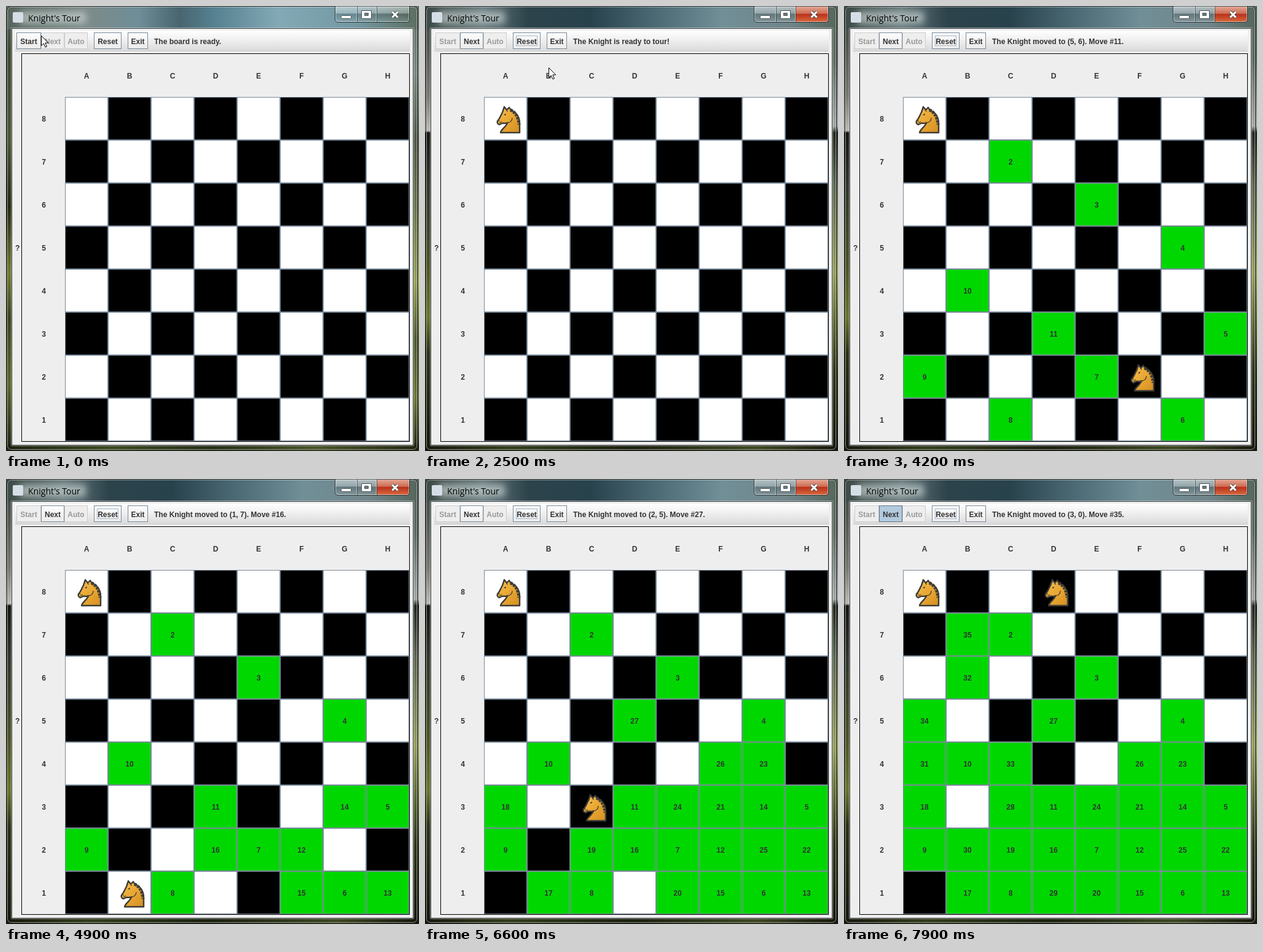
An HTML page for the animation above (8 s loop, 672 px wide and 724 px high).

```html
<!DOCTYPE html>
<html lang="en">
<head>
<meta charset="utf-8">
<title>Knight's Tour</title>
<style>
html, body { margin: 0; width: 100%; height: 100%; overflow: hidden; background: #222; }
svg { display: block; width: 672px; height: 724px; }
text { font: bold 12px "Liberation Sans", Arial, sans-serif; fill: #333; }
.mid { text-anchor: middle; }
.title { font: 14px "Open Sans", "Noto Sans", sans-serif; fill: #000; }
.btn rect { fill: url(#face); stroke: #7a8a99; }
.btn .focus { fill: none; stroke: #a3b8cc; visibility: hidden; }
.btn.focused .focus { visibility: visible; }
.btn.off rect { fill: #eee; stroke: #ccc; }
.btn.off text { fill: #999; }
.btn.down .face { fill: #b2cade; stroke: #5f7183; }
.cell { stroke: #7a8a99; }
</style>
</head>
<body>
<svg id="stage" viewBox="0 0 672 724" xmlns="http://www.w3.org/2000/svg">
<defs>
  <linearGradient id="face" x2="0" y2="1"><stop stop-color="#fdfdfd"/><stop offset="1" stop-color="#ebebeb"/></linearGradient>
  <linearGradient id="bar" x2="0" y2="1"><stop stop-color="#fff"/><stop offset=".45" stop-color="#f0f0f0"/><stop offset="1" stop-color="#dadada"/></linearGradient>
  <linearGradient id="red" x2="0" y2="1"><stop stop-color="#e3a796"/><stop offset=".45" stop-color="#cf6a50"/><stop offset=".5" stop-color="#b8321a"/><stop offset="1" stop-color="#d9693f"/></linearGradient>
  <linearGradient id="glass" x2="0" y2="1"><stop stop-color="#fff" stop-opacity=".5"/><stop offset=".45" stop-color="#fff" stop-opacity=".25"/><stop offset=".5" stop-color="#000" stop-opacity=".12"/><stop offset="1" stop-color="#fff" stop-opacity=".15"/></linearGradient>
  <linearGradient id="coat" x2="1" y2="1"><stop stop-color="#f3c050"/><stop offset=".5" stop-color="#e9a733"/><stop offset="1" stop-color="#d48f22"/></linearGradient>
  <filter id="soft" x="-30%" y="-80%" width="160%" height="260%"><feGaussianBlur stdDeviation="6"/></filter>
  <g id="knight">
    <path d="M33 16L37 21L41 17L44 22C53 25 58 33 58 43V58H27C28 52 36 49 38 42C34 44 32 42 29 43L25 45C22 44 21 42 22 39C26 35 27 30 30 25C31 22 32 19 33 16Z" fill="url(#coat)" stroke="#3e3d38" stroke-width="2.4" stroke-linejoin="round"/>
    <path d="M43 21C51 25 56 32 57 45" fill="none" stroke="#3e3d38" stroke-width="5" stroke-dasharray="4 1.5"/>
    <path d="M46 34C46 39 42 42 38 42M25 42L29 40M37 21L38 24" fill="none" stroke="#3e3d38" stroke-width="1.3"/>
    <path d="M32 29L36 27L35 30Z" fill="#2c2b28"/>
    <circle cx="24.5" cy="39" r=".9" fill="#3e3d38"/>
  </g>
</defs>
<g id="idle"></g>
<g id="live"></g>
<g id="frame"></g>
<g id="client"></g>
<g id="board"></g>
<use id="first" href="#knight" x="96" y="148"/>
<use id="rider" href="#knight"/>
<path id="arrow" d="M.5 .5V16.5L4.2 13L7 19L9.4 18L6.8 12H11.8Z" fill="#fff" stroke="#000"/>
</svg>
<script>
const $ = id => document.getElementById(id);
const NS = 'http://www.w3.org/2000/svg';

function add(parent, tag, attrs, text) {
  const el = document.createElementNS(NS, tag);
  for (const key in attrs) el.setAttribute(key, attrs[key]);
  if (text) el.textContent = text;
  parent.appendChild(el);
  return el;
}

const box = (parent, x, y, width, height, fill, more) =>
  add(parent, 'rect', { x, y, width, height, fill, ...more });

// stops: "offset colour" pairs separated by commas
function gradient(id, stops, vertical) {
  const g = add(document.querySelector('defs'), 'linearGradient',
    { id, x2: vertical ? 0 : 1, y2: vertical ? 1 : 0 });
  for (const stop of stops.split(',')) {
    const [offset, color] = stop.trim().split(' ');
    add(g, 'stop', { offset, 'stop-color': color });
  }
  return `url(#${id})`;
}

// Blurred landscape seen through the glass border
function scenery(id, top, left, right, bottom) {
  const g = $(id);
  box(g, 0, 0, 12, 724, gradient(id + 'L', left, true));
  box(g, 660, 0, 12, 724, gradient(id + 'R', right, true));
  box(g, 0, 712, 672, 12, gradient(id + 'B', bottom));
  box(g, 0, 0, 672, 38, gradient(id + 'T', top));
}

scenery('idle',
  '0 #56645c, .2 #7c8b89, .32 #6f8e98, .42 #486570, .5 #55808f, .66 #83a9b6, .85 #7398a2, 1 #5c6e60',
  '0 #55635a, .1 #3c4a30, .3 #4a5535, .45 #23290f, .6 #6f7b33, .7 #39431a, .85 #59672a, 1 #1d2210',
  '0 #5f7064, .15 #7b8a80, .3 #4d5a45, .45 #68754c, .62 #98a354, .75 #4e5a28, .88 #6c7836, 1 #20260f',
  '0 #1d2210, .25 #3d4820, .5 #262d16, .75 #4a5428, 1 #20260f');
scenery('live',
  '0 #3c4a45, .14 #66777a, .25 #2c434b, .4 #28424c, .55 #4a6873, .72 #718f97, .88 #70858a, 1 #55665b',
  '0 #3c4a45, .08 #4e544c, .2 #77796f, .28 #b9bab2, .285 #14170f, .4 #30362a, .58 #4a5226, .7 #66752a, .78 #2a3115, 1 #15180c',
  '0 #55665b, .12 #5d6b62, .27 #a2a9a4, .285 #20261c, .4 #5b6650, .6 #96a05a, .72 #59662e, .82 #2d3518, 1 #15180c',
  '0 #15180c, .2 #343d1b, .5 #1b200f, .8 #3f4822, 1 #15180c');

const frame = $('frame');
const line = (x, y, w, h, stroke, rx) => box(frame, x, y, w, h, 'none', { stroke, rx });
line(1.5, .5, 668, 722, '#15191a', 7);
line(2.5, 1.5, 666, 720, 'rgba(255,255,255,.5)', 6);
line(8.5, 35.5, 655, 680, 'rgba(255,255,255,.5)', 1);
line(9.5, 36.5, 653, 678, '#2b3234', 0);
box(frame, 22, 9, 108, 20, '#cfdad9', { filter: 'url(#soft)', opacity: .65 });
box(frame, 11, 10, 17, 17, '#d5dee6', { rx: 2 });
add(frame, 'text', { x: 36, y: 25, class: 'title' }, "Knight's Tour");

// Window controls
const controls = 'M535.5 0V21Q535.5 26.5 541 26.5H651Q656.5 26.5 656.5 21V0Z';
add(frame, 'path', { d: controls, fill: 'url(#glass)', stroke: '#273236' });
const close = add(frame, 'path', { d: 'M603 1H656V21Q656 26 651 26H603Z', fill: 'url(#red)' });
add(frame, 'path', { d: 'M536.5 1V21Q536.5 25.5 541 25.5H651Q655.5 25.5 655.5 21V1M570.5 1V26M602.5 1V26', fill: 'none', stroke: '#fff', 'stroke-opacity': .5 });
add(frame, 'path', { d: 'M571.5 1V26M603.5 1V26', stroke: '#273236', 'stroke-opacity': .7 });
box(frame, 545.5, 15.5, 16, 5, '#fff', { stroke: '#4a5559', rx: 1 });
add(frame, 'path', { d: 'M578.5 7.5H594.5V20.5H578.5ZM583.5 11.5V15.5H589.5V11.5Z', fill: '#fff', stroke: '#4a5559', 'fill-rule': 'evenodd' });
for (const [stroke, width] of [['#4a5559', 5], ['#fff', 3]])
  add(frame, 'path', { d: 'M628.5 9.5L637.5 18.5M637.5 9.5L628.5 18.5', stroke, 'stroke-width': width });

// Client area and toolbar
const client = $('client');
box(client, 10, 37, 652, 677, '#eee');
box(client, 15, 40, 642, 33, 'url(#bar)');
box(client, 15, 73, 642, 1, '#ccc');

const buttons = {};
function button(name, x, w) {
  const g = add(client, 'g', {});
  box(g, x + .5, 43.5, w - 1, 26, '', { class: 'face' });
  box(g, x + 5.5, 48.5, w - 11, 16, '', { class: 'focus' });
  add(g, 'text', { x: x + w / 2, y: 62, class: 'mid' }, name);
  buttons[name] = g;
}
button('Start', 17, 40);
button('Next', 57, 38);
button('Auto', 95, 38);
button('Reset', 143, 45);
button('Exit', 198, 33);
const status = add(client, 'text', { x: 241, y: 62 });
add(client, 'text', { x: 15, y: 398 }, '?');
box(client, 25.5, 77.5, 631, 631, '#eee', { stroke: '#000' });

// Board
const SIZE = 70, LEFT = 96, TOP = 148;
const cells = [];
for (let row = 0; row < 8; row++) {
  const y = TOP + row * SIZE;
  add(client, 'text', { x: 61.5, y: y + 40, class: 'mid' }, String(8 - row));
  add(client, 'text', { x: LEFT + 35 + row * SIZE, y: 118, class: 'mid' }, 'ABCDEFGH'[row]);
  for (let col = 0; col < 8; col++) {
    const x = LEFT + col * SIZE;
    cells.push({
      base: (row + col) % 2 ? '#000' : '#fff',
      rect: box($('board'), x + .5, y + .5, SIZE - 1, SIZE - 1, '', { class: 'cell' }),
      label: add($('board'), 'text', { x: x + 35, y: y + 40, class: 'mid' })
    });
  }
}

const tour = ('A8 C7 E6 G5 H3 G1 E2 C1 A2 B4 D3 F2 H1 G3 F1 D2 B1 A3 ' +
  'C2 E1 F3 H2 G4 E3 G2 F4 D5 C3 D1 B2 A4 B6 C4 A5 B7 D8').split(' ')
  .map(s => ({ col: s.charCodeAt(0) - 65, row: 8 - s[1] }));

const LOOP = 8000, TICK = 100;
const ACTIVE = 300, PRESS = 400, READY = 500, AUTO_DOWN = 2300, AUTO = 2400;
const BEGIN = 2437, STEP = 153, IDLE = 85;

// Pointer stops: time, x, y
const path = [[0, 57, 48], [100, 40, 57], [1700, 40, 57], [2200, 110, 57], [2400, 110, 57], [2800, 690, 330]];

function pointer(t) {
  const i = path.findIndex(p => p[0] > t);
  if (i < 0) return null;
  const [a, b] = [path[i - 1], path[i]];
  const u = (t - a[0]) / (b[0] - a[0]);
  const s = u * u * (3 - 2 * u);
  return [a[1] + (b[1] - a[1]) * s, a[2] + (b[2] - a[2]) * s];
}

function setButton(name, off, focused, down) {
  const list = ['btn', off && 'off', focused && 'focused', down && 'down'];
  buttons[name].setAttribute('class', list.filter(Boolean).join(' '));
}

const show = (el, on) => el.setAttribute('visibility', on ? 'visible' : 'hidden');

function draw(t) {
  const ready = t >= READY, auto = t >= AUTO;
  const since = t - BEGIN;
  const moves = Math.max(0, Math.min(tour.length - 1, Math.floor(since / STEP)));
  const pressing = since > 0 && since % STEP >= IDLE;

  show($('live'), t >= ACTIVE);
  show(close, t >= ACTIVE);
  setButton('Start', ready, false, t >= PRESS && !ready);
  setButton('Next', !ready, ready && !auto, pressing);
  setButton('Auto', !ready || auto, false, t >= AUTO_DOWN && !auto);
  setButton('Reset', false, auto);
  setButton('Exit');

  for (const c of cells) {
    c.rect.setAttribute('fill', c.base);
    c.label.textContent = '';
  }
  for (let i = 1; i < moves; i++) {
    const c = cells[tour[i].row * 8 + tour[i].col];
    c.rect.setAttribute('fill', '#00d700');
    c.label.textContent = i + 1;
  }

  const { col, row } = tour[moves];
  show($('first'), ready);
  show($('rider'), moves > 0);
  $('rider').setAttribute('x', LEFT + col * SIZE);
  $('rider').setAttribute('y', TOP + row * SIZE);
  status.textContent = moves ? `The Knight moved to (${col}, ${row}). Move #${moves}.`
    : ready ? 'The Knight is ready to tour!' : 'The board is ready.';

  const at = pointer(t);
  show($('arrow'), at);
  if (at) $('arrow').setAttribute('transform', `translate(${at.map(Math.round)})`);
}

let last = -1;
const origin = performance.now();
function tick() {
  const t = Math.floor((performance.now() - origin) % LOOP / TICK) * TICK;
  if (t !== last) draw(last = t);
  requestAnimationFrame(tick);
}
tick();
</script>
</body>
</html>
```
